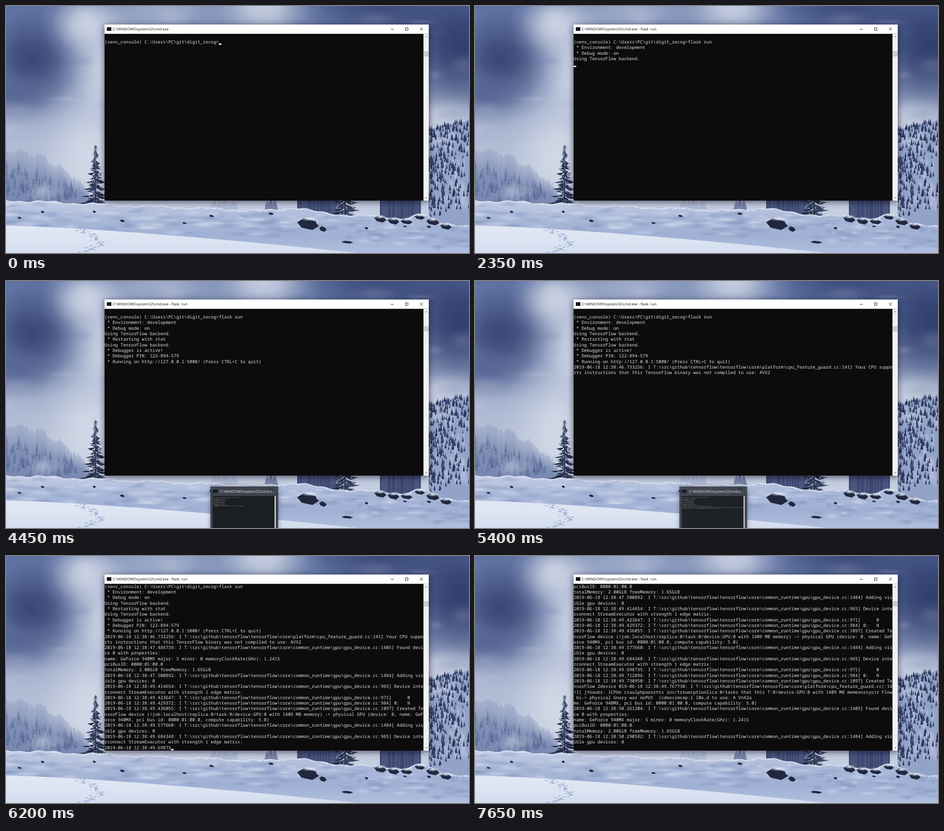
An HTML page with a canvas for the animation above (8 s loop, 1024x547 px).

```html
<!DOCTYPE html>
<html lang="en">
<head>
<meta charset="utf-8">
<title>Console</title>
<style>
html, body { margin: 0; width: 100%; height: 100%; overflow: hidden; background: #5d73a5; }
canvas { display: block; width: 100vw; height: 100vh; }
</style>
</head>
<body>
<canvas id="stage" width="1024" height="547"></canvas>
<script>
const W = 1024, H = 547, LOOP = 8000, STEP = 50;
const CELL_W = 5.875, CELL_H = 12.3, ROWS = 30;
const LEFT = 218, TOP = 61.6;
const MONO = '9.79px "Noto Sans Mono", "DejaVu Sans Mono", monospace';
const SANS = '8.1px "Open Sans", "Noto Sans", sans-serif';
const TITLE = 'C:\\WINDOWS\\system32\\cmd.exe';

// ---------- console output ----------
const PROMPT = '(venv_console) C:\\Users\\PC\\git\\digit_recog>';
const core = (time, rest) => `2019-06-18 12:38:${time}: I T:\\src\\github\\tensorflow\\tensorflow\\core\\${rest}`;
const gpu = (time, rest) => core(time, `common_runtime\\gpu\\gpu_device.cc:${rest}`);
const found = time => [
  gpu(time, '1405] Found devi'), 'ce 0 with properties:',
  'name: GeForce 940MX major: 5 minor: 0 memoryClockRate(GHz): 1.2415',
  'pciBusID: 0000:01:00.0', 'totalMemory: 2.00GiB freeMemory: 1.65GiB'];
const adding = time => [gpu(time, '1484] Adding vis'), 'ible gpu devices: 0'];
const matrix = (a, b, c, d) => [
  gpu(a, '965] Device inte'), 'rconnect StreamExecutor with strength 1 edge matrix:',
  gpu(b, '971]      0'), gpu(c, '984] 0:   N'), gpu(d, '1097] Created Te')];

const FAST = 10, SLOW = 0.5; // characters per ms
const batch = (start, lines, rate = FAST) => ({ start, lines, rate });
const BATCHES = [
  batch(1795, [' * Environment: development', ' * Debug mode: on']),
  batch(2345, ['Using TensorFlow backend.']),
  batch(3045, [' * Restarting with stat']),
  batch(4195, ['Using TensorFlow backend.']),
  batch(4395, [' * Debugger is active!', ' * Debugger PIN: 122-894-579',
    ' * Running on http://127.0.0.1:5000/ (Press CTRL+C to quit)']),
  batch(4800, [core('46.733256', 'platform\\cpu_feature_guard.cc:141] Your CPU suppo'),
    'rts instructions that this TensorFlow binary was not compiled to use: AVX2'], SLOW),
  batch(5440, found('47.484739')),
  batch(5530, adding('47.500892')),
  batch(5916, [...matrix('49.414654', '49.423647', '49.429372', '49.436055'),
    'nsorFlow device (/job:localhost/replica:0/task:0/device:GPU:0 with 1409 MB memory) -> physical GPU (device: 0, name: GeF',
    'orce 940MX, pci bus id: 0000:01:00.0, compute capability: 5.0)']),
  batch(6079, adding('49.577660')),
  batch(6180.3, [...matrix('49.684348', '49.698735', '49.712896', '49.730950'),
    'nsorFlow 2device 0' + core('49.767730', 'platform\\cpu_feature_guard.cc(:14').slice(2),
    '/1] jYooubr: lCPUo csaulphpoosrtts ins/trruecptionlica:0/tasks that this T:0/device:GPU:0 with 1409 MB memeonrsyo)r Flow',
    ' bi-> physical Gnary was noPUt  (cdeovimcep:i l0e,d to use: A VnX2a',
    'me: GeForce 940MX, pci bus id: 0000:01:00.0, compute capability: 5.0)']),
  batch(6677, found('50.261204')),
  batch(6720, adding('50.290582'))
];
const CARET_OFF = [[300, 800], [1300, 1500], [3200, 3700], [4200, 5700], [7650, LOOP]];

const commandAt = t => t < 1000 ? '' : t >= 1150 && t < 1500 ? 'set FLASK_ENV=development' : 'flask run';

// rows printed so far; the caret stands at the end of the last one
function rowsAt(t) {
  const rows = ['', PROMPT + commandAt(t)];
  if (t < 1650) return rows;
  for (const { start, lines, rate } of BATCHES) {
    if (t < start) break;
    let budget = Math.round((t - start) * rate);
    for (const line of lines) {
      rows.push(line.slice(0, budget));
      if (budget < line.length) return rows;
      budget -= line.length;
    }
  }
  return [...rows, ''];
}

const ramp = (t, from, to) => Math.min(1, Math.max(0, (t - from) / (to - from)));

// opacity of the taskbar preview
function previewAt(t) {
  if (t < 3950 || t >= 5550) return 0;
  return t < 5350 ? 0.24 + 0.72 * ramp(t, 3950, 4150) : 0.96 * (1 - ramp(t, 5350, 5550) ** 2);
}

// ---------- drawing helpers ----------
const ctx = document.getElementById('stage').getContext('2d');
const backdrop = document.createElement('canvas');
backdrop.width = W;
backdrop.height = H;
const bg = backdrop.getContext('2d');
let seed = 7;
const rnd = (a = 0, b = 1) => {
  seed = (seed * 16807) % 2147483647;
  return a + (b - a) * seed / 2147483647;
};
const bump = (x, center, width) => Math.exp(-(((x - center) / width) ** 2));

function box(c, x, y, w, h, color) {
  c.fillStyle = color;
  c.fillRect(x, y, w, h);
}

function poly(color, ...points) {
  bg.beginPath();
  for (let i = 0; i < points.length; i += 2) bg.lineTo(points[i], points[i + 1]);
  bg.fillStyle = color;
  bg.fill();
}

function blob(x, y, rx, ry, rgb, alpha = 0.85) {
  bg.save();
  bg.translate(x, y);
  bg.scale(rx, ry);
  const g = bg.createRadialGradient(0, 0, 0, 0, 0, 1);
  for (let k = 0; k <= 1; k += 0.25) g.addColorStop(k, `rgba(${rgb},${alpha * (1 + Math.cos(Math.PI * k)) / 2})`);
  box(bg, -1, -1, 2, 2, g);
  bg.restore();
}

function vertical(y0, y1, ...colors) {
  const g = bg.createLinearGradient(0, y0, 0, y1);
  colors.forEach((c, i) => g.addColorStop(i / (colors.length - 1), c));
  return g;
}

// fill everything below the curve y(x)
function below(curve, color, from = 0) {
  bg.beginPath();
  for (let x = from; x <= W; x += 2) bg.lineTo(x, curve(x));
  bg.lineTo(W, H);
  bg.lineTo(from, H);
  bg.fillStyle = color;
  bg.fill();
}

const fir = (x, y, h, color) => poly(color, x, y - h, x + h * 0.17, y, x - h * 0.17, y);

function rock(x, y, rx, ry) {
  poly('#20273e', x - rx, y - ry * 0.3, x - rx * 0.4, y - ry, x + rx * 0.5, y - ry * 0.6,
    x + rx, y + ry * 0.3, x + rx * 0.4, y + ry, x - rx * 0.6, y + ry * 0.6);
}

// ragged drooping boughs flecked with snow
function spruce(x, top, bottom, spread, from = 0) {
  poly('#26304c', x, top, x + 2, bottom, x - 2, bottom);
  for (let k = from; k < 1; k += 0.006) {
    const y = top + k * (bottom - top), side = rnd() < 0.5 ? -1 : 1;
    const reach = (3 + spread * k) * rnd(0.25, 1) * (0.8 + 0.2 * Math.sin(k * 55));
    const tip = x + side * reach;
    poly(rnd() < 0.6 ? '#222b45' : '#36415f', x, y - 3, tip, y + rnd(0, 5), x + side * reach * 0.5, y + 4);
    if (rnd() < 0.5) {
      const fleck = x + side * reach * rnd(0.3, 1);
      poly('#a3afcb', fleck - 4, y + 1, fleck, y - 1, fleck + 4, y + 1.5);
    }
  }
}

// ---------- landscape ----------
const ridge = x => 430 + 0.04 * x + 17 * (x / W) ** 8 - 10 * bump(x, 640, 40) - 12 * bump(x, 918, 24)
  + 2 * Math.sin(x / 19) + 1.2 * Math.sin(x / 6.3);
const meadow = x => 486 + 60 * (x / 770) ** 1.35;
const slope = x => 272 - 20 * (x - 936) / 88 + 2 * Math.sin(x / 5);

function paintSky() {
  const navy = '44,58,106', mid = '84,100,148', pale = '214,220,232';
  box(bg, 0, 0, W, H, vertical(0, 450, '#6478a8', '#8b9bc0', '#b0bbd4', '#c6cfe0'));
  blob(55, 120, 150, 150, navy);
  blob(20, 195, 120, 70, mid);
  blob(175, 40, 100, 90, pale);
  blob(225, 140, 110, 180, pale);
  blob(185, 330, 130, 170, pale);
  blob(350, 10, 200, 90, pale, 0.5);
  blob(570, 0, 140, 100, pale);
  blob(830, 0, 230, 150, navy, 0.7);
  blob(1010, 90, 190, 190, navy, 0.95);
  blob(970, 250, 130, 60, pale, 0.6);
  for (let i = 0; i < 70; i++)
    blob(rnd(0, W), rnd(0, 300), rnd(20, 70), rnd(8, 30), rnd() < 0.5 ? mid : pale, 0.16);
}

function paintWoods() {
  for (let x = 0; x < 215; x += 2) {
    const top = 318 + 100 * (x / 190) ** 2 + 5 * Math.sin(x / 7) + rnd(-4, 4);
    box(bg, x, top, 2, 440 - top, vertical(top, 440, 'rgba(118,134,176,.25)', 'rgba(112,129,172,.8)', 'rgba(100,117,162,.8)'));
  }
  for (let i = 0; i < 100; i++) {
    const x = rnd(0, 155);
    fir(x, rnd(350 + x * 0.4, 434), rnd(9, 26), 'rgba(66,84,130,.28)');
  }
  blob(85, 412, 45, 28, '190,200,222', 0.6);

  // mountainside: dark forest thinning into snow on the right
  const shade = bg.createLinearGradient(936, 0, W, 60);
  ['#47557f', '#5d6c98', '#93a3c8'].forEach((c, i) => shade.addColorStop(i / 2, c));
  below(slope, shade, 934);
  for (let i = 0; i < 45; i++) {
    const y = rnd(285, 455);
    blob(rnd(945, W), y, rnd(4, 11), rnd(8, 24), '180,192,218', 0.75);
  }
  for (let i = 0; i < 420; i++) {
    const x = rnd(932, W), depth = rnd() ** 1.3;
    if (rnd() > 0.25 + 0.75 * (W - x) / 88) continue;
    fir(x, slope(x) + 4 + depth * 195, rnd(7, 17), rnd() < 0.5 ? '#364369' : '#29345a');
  }
  blob(958, 297, 9, 24, '190,201,224', 0.9);

  // strip under the window
  box(bg, LEFT, 425, 717, 60, '#c5cee0');
  for (let x = 455; x < 915; x += 3) {
    const dark = (x > 643 && x < 738) || x > 824, lone = x > 572 && x < 602;
    if (dark) box(bg, x, 425, 3.5, 52, rnd() < 0.5 ? '#4a567d' : '#3d4870');
    else if (lone || x < 510) fir(x, 462, rnd(24, 40), lone ? '#7885a9' : '#b0bcd4');
  }
  spruce(198, 309, 442, 36);
  spruce(750, 340, 470, 42, 0.66);
}

function paintSnow() {
  below(ridge, vertical(430, 547, '#c6d0e5', '#a9b8d8', '#a0b0d4', '#b0bfdd'));
  for (let x = 0; x < W; x += 3) box(bg, x, ridge(x), 3, rnd(1, 4), 'rgba(232,237,247,.7)');
  for (let i = 0; i < 150; i++) {
    const x = rnd(0, W);
    blob(x, ridge(x) + rnd(8, 60), rnd(12, 45), rnd(3, 9), rnd() < 0.5 ? '216,224,240' : '124,143,188', 0.4);
  }
  below(meadow, vertical(485, 547, '#e1e8f4', '#dce4f2', '#d3ddee'));
  for (let k = 0; k < 1; k += 0.027)
    box(bg, 150 + 45 * Math.sin(k * 3) + rnd(-9, 18), 494 + 52 * k, rnd(3, 9), 1.3, '#8fa2ca');

  rock(668, 483, 24, 13);
  rock(701, 494, 8, 6);
  rock(755, 523, 13, 3);
  blob(672, 471, 26, 6, '222,229,242', 0.9);
  for (let x = 828; x < 975; x += 29) {
    const y = ridge(x) + 7;
    rock(x, y, rnd(11, 18), rnd(5, 8));
    blob(x, y - 5, 15, 5, '222,229,242', 0.95);
  }
  for (let x = 30; x < W; x += rnd(35, 150)) rock(x, ridge(x) + rnd(8, 38), rnd(3, 6), rnd(1.5, 3));
}

// ---------- window frame ----------
function line(...points) {
  bg.beginPath();
  for (let i = 0; i < points.length; i += 2) bg.lineTo(points[i], points[i + 1]);
  bg.stroke();
}

function paintWindow() {
  bg.save();
  bg.shadowColor = 'rgba(0,0,20,.6)';
  bg.shadowBlur = 14;
  bg.shadowOffsetY = 3;
  box(bg, 218, 41, 717, 390, '#0c0c0c');
  bg.restore();
  box(bg, 218, 41, 717, 20.6, '#fff');
  box(bg, 223, 47, 10, 8, '#14161c');
  bg.strokeStyle = '#222';
  bg.lineWidth = 1;
  line(851, 51.5, 857.5, 51.5);
  bg.strokeRect(883.5, 48.5, 5.5, 5.5);
  line(915.5, 48, 922, 54.5);
  line(922, 48, 915.5, 54.5);
  box(bg, 923.3, 61.6, 11.7, 369.4, '#f0f0f0');
  box(bg, 924, 100, 11, 12, '#cdcdcd');
  bg.strokeStyle = '#505050';
  line(927, 69.5, 929.3, 67, 931.6, 69.5);
  line(927, 423.5, 929.3, 426, 931.6, 423.5);
}

// ---------- animated parts ----------
function text(string, x, y, font, color) {
  ctx.font = font;
  ctx.fillStyle = color;
  ctx.fillText(string, x, y);
}

// console cells, with the origin at the top left of the client area
function drawConsole(t) {
  const rows = rowsAt(t).slice(-ROWS);
  ctx.font = MONO;
  ctx.fillStyle = '#dedede';
  rows.forEach((row, r) => [...row].forEach((ch, i) => {
    if (ch !== ' ') ctx.fillText(ch, i * CELL_W, r * CELL_H + 9.2);
  }));
  if (!CARET_OFF.some(([from, to]) => t >= from && t < to))
    box(ctx, rows.at(-1).length * CELL_W, rows.length * CELL_H - 3.2, CELL_W, 3, '#f2f2f2');
}

function drawPreview(t) {
  const alpha = previewAt(t);
  if (!alpha) return;
  ctx.save();
  ctx.globalAlpha = alpha;
  ctx.translate(0, Math.max(0, 0.9 - alpha) * 9);
  ctx.save();
  ctx.shadowColor = 'rgba(0,0,20,.4)';
  ctx.shadowBlur = 10;
  box(ctx, 452, 455, 150, 100, 'rgba(56,60,68,.94)');
  ctx.restore();
  box(ctx, 458, 462, 10, 7, '#14161c');
  text(TITLE.slice(0, -2) + '...', 473, 469, SANS, '#f4f4f4');
  box(ctx, 457, 476, 140, 80, '#1b1e22');
  box(ctx, 594, 476, 2.5, 80, '#eee');
  ctx.translate(457, 476);
  ctx.scale(0.195, 0.195);
  drawConsole(t);
  ctx.restore();
}

function draw(t) {
  ctx.textRendering = 'geometricPrecision';
  ctx.drawImage(backdrop, 0, 0);
  text(TITLE + (t >= 1550 ? ' - flask  run' : ''), 236, 54.4, SANS, '#111');
  ctx.save();
  ctx.translate(LEFT, TOP);
  drawConsole(t);
  ctx.restore();
  drawPreview(t);
}

paintSky();
paintWoods();
paintSnow();
paintWindow();
let shown = -1;
const start = performance.now();
function tick() {
  const t = Math.floor(((performance.now() - start) % LOOP) / STEP) * STEP;
  if (t !== shown) draw(shown = t);
  requestAnimationFrame(tick);
}
tick();
</script>
</body>
</html>
```
